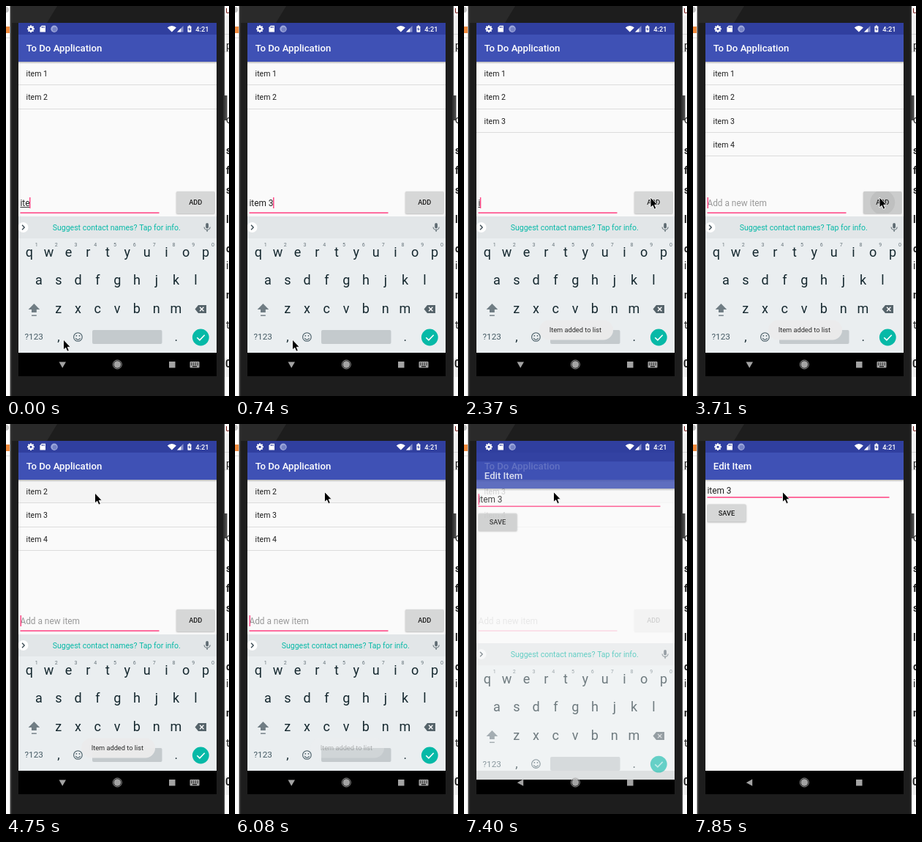
These frames come from a looping animation (305x532 px, 8000 ms). An HTML page with a canvas:

```html
<!DOCTYPE html>
<html lang="en">
<head>
<meta charset="utf-8">
<title>To-do list</title>
<style>
html, body { margin: 0; width: 100%; height: 100%; overflow: hidden; background: #fff; }
canvas { display: block; width: 305px; height: 532px; }
</style>
</head>
<body>
<canvas id="stage"></canvas>
<script>
const W = 305, H = 532, LOOP = 8000;
const canvas = document.getElementById('stage');
const dpr = window.devicePixelRatio || 1;
canvas.width = W * dpr;
canvas.height = H * dpr;
const c = canvas.getContext('2d');

const FONT = 'Roboto, "Noto Sans", sans-serif';
const PINK = '#ff4081', TEAL = '#06b9a7', PAPER = '#fafafa', KEY = '#15282f';
const SP = 0.659; // one Android sp in stage pixels
const TOP = 23, NAV = 473, BOTTOM = 505;

const clamp = v => Math.max(0, Math.min(1, v));
const ramp = (t, a, b) => clamp((t - a) / (b - a));
const ease = p => p * p * (3 - 2 * p);

function rect(x, y, w, h, fill) {
  c.fillStyle = fill;
  c.fillRect(x, y, w, h);
}

function round(x, y, w, h, r, fill) {
  c.fillStyle = fill;
  c.beginPath();
  c.roundRect(x, y, w, h, r);
  c.fill();
}

function disc(x, y, r, fill) {
  c.fillStyle = fill;
  c.beginPath();
  c.arc(x, y, r, 0, 7);
  c.fill();
}

function poly(points, fill) {
  c.beginPath();
  points.forEach(([x, y]) => c.lineTo(x, y));
  c.closePath();
  c.fillStyle = fill;
  c.fill();
}

function stroke(points, color, width) {
  c.strokeStyle = color;
  c.lineWidth = width;
  c.beginPath();
  points.forEach(([x, y]) => c.lineTo(x, y));
  c.stroke();
}

function text(s, x, y, size, fill, align = 'left', weight = 400) {
  c.font = `${weight} ${size}px ${FONT}`;
  c.textAlign = align;
  c.fillStyle = fill;
  c.fillText(s, x, y);
  return c.measureText(s).width;
}

function layer(alpha, dy, draw) {
  if (alpha <= 0) return;
  c.save();
  c.globalAlpha *= alpha;
  c.translate(0, dy);
  draw();
  c.restore();
}

// Timed states: [start, value]
function at(track, t) {
  let value = track[0][1];
  for (const [start, v] of track) if (t >= start) value = v;
  return value;
}

const typed = [[0, 'ite'], [150, 'item'], [440, 'item '], [740, 'item 3'], [1700, ''],
  [2370, 'i'], [2520, 'it'], [2670, 'ite'], [2810, 'item'], [2960, 'item 4'], [3560, '']];
const strip = [[0, 'tip'], [150, 'words'], [440, ''], [1700, 'tip'], [2810, 'words'],
  [2960, ''], [3560, 'tip']];
const items = [[0, [1, 2]], [1700, [1, 2, 3]], [3560, [1, 2, 3, 4]], [4750, [2, 3, 4]],
  [6670, [3, 4]]];
const pointer = [[0, 78, 455], [740, 78, 455], [1400, 254.5, 261], [3780, 254.5, 261],
  [4400, 121, 94], [5000, 121, 94], [5150, 124, 88], [5490, 124, 88], [5800, 122, 92.5],
  [LOOP, 122, 92.5]];

function caretOn(t) {
  if (t < 740) return true;
  if (t < 1700) return t < 1240;
  if (t < 2370) return t < 2200;
  if (t < 3560) return t < 3460;
  if (t < 3700) return true;
  return Math.floor((t - 3700) / 495) % 2 === 0;
}

function backdrop() {
  rect(0, 0, W, H, '#fff');
  disc(0, 5, 4, '#c4c4c4');
  rect(0, 28, 5, 9, '#f08a3c');
  rect(0, 43, 6, 1, '#ddd');
  rect(299, 13, 6, 50, '#f1f1f1');
  rect(299, 38, 6, 1, '#d5d5d5');
  rect(299, 62, 6, 1, '#d5d5d5');
  text('u', 300, 10, 13, '#7b2320');
  const edge = [['p', 59, 400], ['o', 160, 400], ['s', 202, 700], ['f', 229, 700],
    ['s', 256, 700], ['l', 296, 700], ['d', 336, 700], ['i', 359, 400], ['n', 399, 700],
    ['t', 440, 400]];
  edge.forEach(([s, y, weight]) => text(s, 301, y, 14, '#222', 'left', weight));
  rect(299, 480, 6, 26, '#f0f0f0');
  text('0', 300, 493, 14, '#222', 'left', 700);

  rect(5, 0, 1, H, '#aaa');
  rect(6, 0, 293, H, '#1d1d1d');
  poly([[6, 0], [70, 0], [56, TOP], [6, TOP]], '#2a2a2a');
  rect(6, 0, 2, H, '#333');
  rect(297, 0, 2, H, '#303030');
  rect(299, 122, 3.5, 34, '#444');
}

// Areas do not overlap, so the whole screen can be faded as one
function appBar(title) {
  rect(17, TOP, 271, 16, '#303f9f');
  rect(17, 39, 271, 37, '#3f51b5');
  rect(17, 76, 271, NAV - 76, PAPER);
  rect(17, NAV, 271, BOTTOM - NAV, '#000');
  const shade = c.createLinearGradient(0, 76, 0, 79);
  shade.addColorStop(0, 'rgba(0,0,0,.28)');
  shade.addColorStop(1, 'rgba(0,0,0,0)');
  rect(17, 76, 271, 3, shade);
  text(title, 27.8, 62.3, 20 * SP, '#fff', 'left', 500);
}

function button(label, x, y, w, h, press = 0) {
  c.save();
  c.shadowColor = 'rgba(0,0,0,.3)';
  c.shadowBlur = 2 * dpr;
  c.shadowOffsetY = 0.8 * dpr;
  round(x, y, w, h, 1.5, '#d6d7d7');
  c.restore();
  const cx = x + w / 2, cy = y + h / 2;
  if (press) {
    c.save();
    c.beginPath();
    c.roundRect(x, y, w, h, 1.5);
    c.clip();
    rect(x, y, w, h, `rgba(0,0,0,${0.05 * press})`);
    disc(cx, cy, 17, `rgba(0,0,0,${0.06 * press})`);
    c.restore();
  }
  text(label, cx, cy + 3.3, 14 * SP, '#1c1c1c', 'center', 500);
}

function listScreen(t) {
  appBar('To Do Application');
  const held = 0.5 * ramp(t, 4200, 4500) * (1 - ramp(t, 5350, 5550))
    + ramp(t, 5850, 6350) * (1 - ramp(t, 6950, 7150))
    + ramp(t, 7150, 7250);
  rect(17, 77, 271, 30.5, `rgba(0,0,0,${0.05 * held})`);
  at(items, t).forEach((n, i) => {
    const y = 75.8 + 32.4 * i;
    text('item ' + n, 27.6, y + 20, 16 * SP, '#1f1f1f');
    rect(17, Math.round(y + 31.3), 271, 1, '#dcdcdc');
  });

  const value = at(typed, t);
  const size = 18 * SP;
  let end = 20;
  if (value) {
    const w = text(value, 19.4, 272.8, size, '#1f1f1f');
    end = 19.4 + w;
    if (!value.includes(' ')) rect(19.4, 274, w, 0.9, '#1f1f1f');
  } else {
    text('Add a new item', 19.4, 272.8, size, '#999');
  }
  if (caretOn(t)) rect(end - 0.4, 261, 1.4, 15, PINK);
  rect(19.5, 281.4, 190, 1.5, PINK);
  const press = ramp(t, 1350, 1480) * (1 - ramp(t, 1900, 2300))
    + ramp(t, 3430, 3560) * (1 - ramp(t, 3800, 4200));
  button('ADD', 233, 253, 52.5, 30, press);
}

function editScreen(t) {
  appBar('Edit Item');
  text('item 3', 19.4, 94.8, 18 * SP, '#1f1f1f');
  if (t < 7750) rect(19.6, 83, 1.4, 15, PINK);
  rect(19.5, 99.3, 249, 1.5, PINK);
  button('SAVE', 19.5, 109.5, 53, 24);
}

function keyRow(letters, x, y, hints) {
  [...letters].forEach((s, i) => {
    const kx = x + 26.8 * i;
    text(s, kx, y, 18, KEY, 'center');
    if (hints) text((i + 1) % 10, kx + 10, 327.5, 7, '#66737a', 'center');
  });
}

function keyboard(t) {
  rect(17, 287, 271, 30, '#e2e6e8');
  rect(17, 317, 271, NAV - 317, '#eaeef0');
  disc(23.5, 302, 7, '#fff');
  stroke([[22, 298.8], [25.2, 302], [22, 305.2]], '#37474f', 1.3);
  const mode = at(strip, t);
  if (mode === 'tip') {
    text('Suggest contact names? Tap for info.', 63.7, 305.8, 16 * SP, TEAL);
  } else if (mode === 'words') {
    ['Item', 'item', 'items'].forEach((s, i) =>
      text(s, 74 + 79.5 * i, 306, 18 * SP, '#37474f', 'center'));
  }
  const gray = '#5f6c73';
  round(273.2, 296, 3.8, 7.5, 1.9, gray);
  c.strokeStyle = gray;
  c.lineWidth = 1.1;
  c.beginPath();
  c.arc(275.1, 301.4, 4, 0, Math.PI);
  c.stroke();
  rect(274.5, 305, 1.2, 3, gray);

  keyRow('qwertyuiop', 31.8, 341.7, true);
  keyRow('asdfghjkl', 45, 380);
  keyRow('zxcvbnm', 71.6, 418.8);

  const shift = '#707d84';
  poly([[38.4, 406], [46.2, 414], [41.8, 414], [41.8, 418], [35, 418], [35, 414], [30.6, 414]], shift);
  rect(35, 421.5, 6.8, 1.4, shift);
  poly([[263, 408], [274, 408], [274, 419], [263, 419], [258.5, 413.5]], '#55636a');
  stroke([[265, 410.8], [270.4, 416.2]], '#fff', 1.3);
  stroke([[270.4, 410.8], [265, 416.2]], '#fff', 1.3);

  text('?123', 38.2, 455.4, 11.7, '#455a64', 'center');
  text(',', 72, 457, 17, KEY, 'center');
  text('.', 232.7, 457, 17, KEY, 'center');
  c.strokeStyle = '#455a64';
  c.lineWidth = 1.1;
  c.beginPath();
  c.arc(98.4, 451.5, 5.8, 0, 7);
  c.stroke();
  c.beginPath();
  c.arc(98.4, 452, 3.2, 0.3, Math.PI - 0.3);
  c.stroke();
  disc(96.3, 449.8, 0.9, '#455a64');
  disc(100.5, 449.8, 0.9, '#455a64');
  round(118, 442, 95.5, 19, 2, '#c4cacd');
  disc(266.3, 452, 11.4, TEAL);
  stroke([[261.3, 452.2], [264.9, 455.8], [271.7, 448.8]], '#fff', 1.6);
}

function statusIcons() {
  for (let i = 0; i < 4; i++) {
    c.save();
    c.translate(34, 31.2);
    c.rotate(i * Math.PI / 4);
    rect(-1, -4.9, 2, 9.8, '#fff');
    c.restore();
  }
  disc(34, 31.2, 3.7, '#fff');
  disc(34, 31.2, 1.5, '#303f9f');
  poly([[48.8, 26.8], [54, 26.8], [54, 35.6], [46.4, 35.6], [46.4, 29.3]], '#fff');
  [48.6, 50.2, 51.8].forEach(x => rect(x, 28, 0.8, 2, '#303f9f'));
  disc(66, 31.2, 4.7, '#9ca6da');
  disc(66.5, 31.8, 3, '#7683c6');

  c.fillStyle = '#fff';
  c.beginPath();
  c.moveTo(226.8, 35.5);
  c.arc(226.8, 35.5, 8.6, -Math.PI * 0.75, -Math.PI * 0.25);
  c.fill();
  poly([[242.5, 27], [242.5, 35.6], [234, 35.6]], '#8790cb');
  poly([[239.3, 30.2], [239.3, 35.6], [234, 35.6]], '#fff');
  round(248.4, 27.4, 5, 8.4, 0.8, '#fff');
  rect(249.9, 26.4, 2, 1.2, '#fff');
  poly([[251.3, 28.6], [249.3, 32], [250.7, 32], [250.5, 34.6], [252.5, 31.2], [251.1, 31.2]], '#303f9f');
  text('4:21', 259.3, 34.6, 14 * SP, '#fff', 'left', 500);
}

function navIcons(keysUp) {
  const gray = '#a3a3a3';
  if (keysUp) {
    poly([[72.5, 485.5], [82, 485.5], [77.2, 493.8]], gray);
    round(251.5, 485, 13, 8.6, 1, gray);
    for (let i = 0; i < 8; i++) {
      rect(253 + (i % 4) * 2.8, 486.6 + (i >> 2) * 2.2, 1.4, 1.1, '#000');
    }
    rect(255, 491.2, 6, 1.1, '#000');
  } else {
    poly([[81.2, 484.6], [81.2, 493.8], [72.8, 489.2]], gray);
  }
  disc(152.3, 489, 4.8, gray);
  c.strokeStyle = gray;
  c.lineWidth = 0.9;
  c.beginPath();
  c.arc(152.3, 489, 6, 0, 7);
  c.stroke();
  rect(223, 485, 8.5, 8.5, gray);
}

function toast() {
  round(103, 428.5, 101, 27, 13.5, 'rgba(236,236,236,.97)');
  text('Item added to list', 152.3, 445, 14 * SP, '#2b2b2b', 'center');
}

function arrow(t) {
  let i = 0;
  while (i < pointer.length - 2 && t >= pointer[i + 1][0]) i++;
  const [t0, x0, y0] = pointer[i], [t1, x1, y1] = pointer[i + 1];
  const p = ease(ramp(t, t0, t1));
  c.save();
  c.translate(x0 + (x1 - x0) * p, y0 + (y1 - y0) * p);
  poly([[0.5, 0], [0.5, 14], [3.7, 11.2], [5.8, 16.2], [8.3, 15.1], [6.2, 10.3], [10.3, 10.2]], '#000');
  c.strokeStyle = '#fff';
  c.lineWidth = 0.9;
  c.stroke();
  c.restore();
}

function draw(t) {
  c.setTransform(dpr, 0, 0, dpr, 0, 0);
  backdrop();
  c.save();
  c.beginPath();
  c.rect(17, TOP, 271, BOTTOM - TOP);
  c.clip();

  listScreen(t);
  const enter = ramp(t, 7250, 7600);
  layer(ramp(t, 7250, 7435), 38 * (1 - enter) ** 2, () => editScreen(t));
  const leave = ramp(t, 7300, 7550);
  layer(1 - leave, 30 * leave, () => keyboard(t));
  layer(ramp(t, 1850, 2100) * (1 - ramp(t, 3850, 4050)), 0, toast);
  layer(ramp(t, 4050, 4300) * (1 - ramp(t, 5730, 6230)), 0, toast);
  statusIcons();
  navIcons(t < 7300);
  c.restore();
  arrow(t);
}

function tick() {
  draw(performance.now() % LOOP);
  requestAnimationFrame(tick);
}
tick();
</script>
</body>
</html>
```
